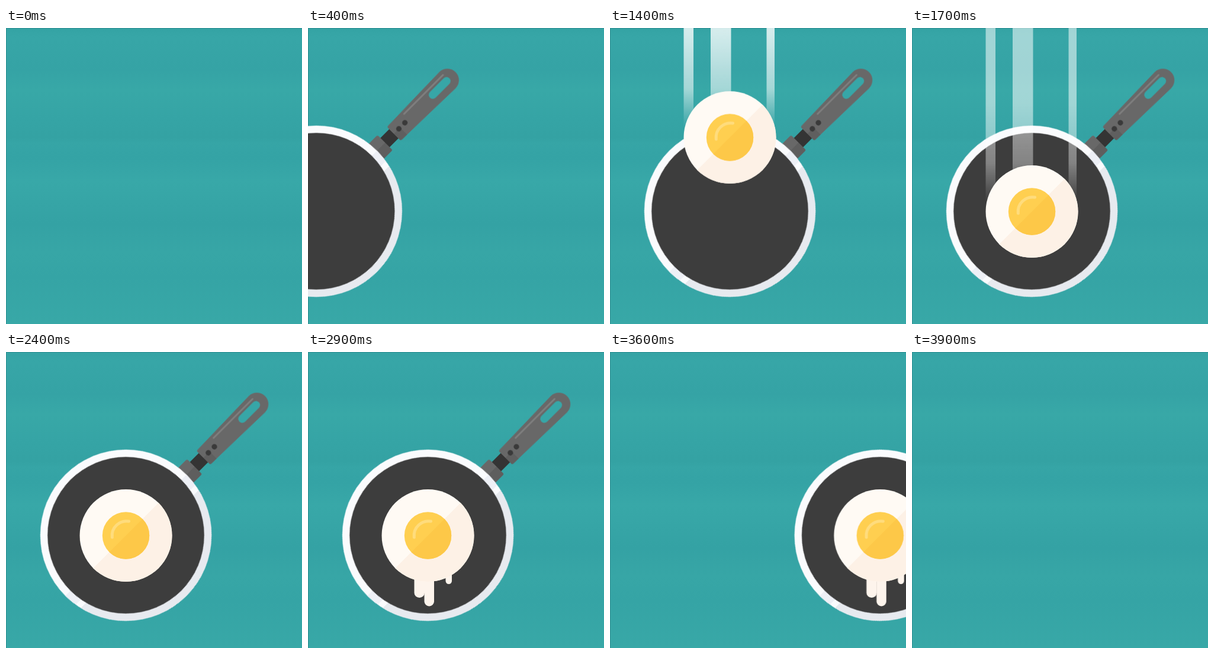
Write an HTML page that moves like this. It is 500x500 px and loops after 4 s.

```html
<!DOCTYPE html>
<html lang="en">
<head>
<meta charset="utf-8">
<title>Egg in a pan</title>
<style>
  html, body { margin: 0; width: 100%; height: 100%; overflow: hidden; background: #36a5a6; }
  svg { display: block; width: 100vw; height: 100vh; }

  .slide, .egg, .trails, .drip { animation: 4s linear infinite; }
  .slide  { animation-name: slide; }
  .egg    { animation-name: fall; }
  .trails { animation-name: fade; }
  .drip   { animation-name: drip; }

  @keyframes slide {
    0% { transform: translateX(-444px); animation-timing-function: cubic-bezier(.37, 0, .63, 1); }
    18.25%, 80% { transform: none; }
    97.5%, 100% { transform: translateX(444px); }
  }
  @keyframes fall {
    0%, 25% { transform: translateY(-390px); animation-timing-function: cubic-bezier(.37, 0, .63, 1); }
    41.25%, 100% { transform: none; }
  }
  @keyframes fade {
    0%, 37.5% { opacity: 1; }
    52.5%, 100% { opacity: 0; }
  }
  @keyframes drip {
    0%, 57.5% { transform: translateY(var(--up)); animation-timing-function: cubic-bezier(.37, 0, .63, 1); }
    72.5%, 100% { transform: none; }
  }
</style>
</head>
<body>
<svg viewBox="0 0 500 500">
  <defs>
    <linearGradient id="wall" x2="0" y2="1">
      <stop offset="0" stop-color="#34a3a4"/>
      <stop offset=".03" stop-color="#37a6a7"/>
      <stop offset=".14" stop-color="#35a3a5"/>
      <stop offset=".21" stop-color="#38a8a7"/>
      <stop offset=".31" stop-color="#35a4a5"/>
      <stop offset=".37" stop-color="#34a2a3"/>
      <stop offset=".39" stop-color="#36a5a6"/>
      <stop offset=".44" stop-color="#34a3a5"/>
      <stop offset=".52" stop-color="#38a8a8"/>
      <stop offset=".66" stop-color="#34a2a4"/>
      <stop offset=".76" stop-color="#37a6a6"/>
      <stop offset=".84" stop-color="#35a4a5"/>
      <stop offset="1" stop-color="#38a8a7"/>
    </linearGradient>
    <linearGradient id="streak" gradientUnits="userSpaceOnUse" x1="0" y1="127" x2="0" y2="295">
      <stop offset="0" stop-color="#fff" stop-opacity=".8"/>
      <stop offset=".6" stop-color="#fff" stop-opacity=".55"/>
      <stop offset="1" stop-color="#fff" stop-opacity="0"/>
    </linearGradient>
    <clipPath id="rim"><circle r="144.7"/></clipPath>
    <clipPath id="lower"><rect x="-200" width="400" height="200"/></clipPath>
  </defs>

  <rect width="500" height="500" fill="url(#wall)"/>
  <path d="M.5 500V.5H500" fill="none" stroke="#2f8f92"/>

  <g class="slide">
    <!-- pan, with x running along the handle -->
    <g transform="translate(202.5 309.5) rotate(-45)">
      <rect x="157" y="-11" width="32" height="22" fill="#343434"/>
      <rect x="130" y="-18" width="34" height="36" rx="3" fill="#686868"/>
      <path d="M130 0h34v15q0 3-3 3h-31z" fill="#5e5e5e"/>

      <path id="grip" d="M188-16.5L313-19.5A19.5 19.5 0 0 1 313 19.5L188 16.5Q185 16.5 185 13.5V-13.5Q185-16.5 188-16.5Z" fill="#686868"/>
      <use href="#grip" clip-path="url(#lower)" style="filter:brightness(.91)"/>
      <path d="M221-11.5H314" stroke="#7d7d7d" stroke-width="3" stroke-linecap="round"/>
      <path d="M278 0H311" stroke="#37a6a7" stroke-width="13.5" stroke-linecap="round"/>
      <g fill="#3a3a3a"><circle cx="197" r="4.6"/><circle cx="211.4" r="4.6"/></g>

      <g clip-path="url(#rim)">
        <rect x="-150" y="-150" width="300" height="300" fill="#fafbfd"/>
        <rect x="-150" width="300" height="23" fill="#eef0f6"/>
        <rect x="-150" y="33" width="300" height="120" fill="#e7eaef"/>
      </g>
      <circle r="132.4" fill="#3d3d3d"/>
    </g>

    <g class="egg">
      <g class="trails" fill="url(#streak)">
        <rect x="124.5" y="-100" width="16.5" height="395"/>
        <rect x="170" y="-100" width="34.5" height="395"/>
        <rect x="264.5" y="-100" width="13.5" height="395"/>
      </g>
      <g fill="#fdf4ec">
        <rect class="drip" style="--up:-34px" x="179.5" y="330" width="17.5" height="85" rx="8.5"/>
        <rect class="drip" style="--up:-48px" x="196.5" y="345" width="16.5" height="84.5" rx="8.2"/>
        <rect class="drip" style="--up:-18px" x="232.5" y="340" width="10.5" height="52" rx="5.2"/>
      </g>
      <g transform="translate(202.5 310) rotate(-45)">
        <circle r="78" fill="#fffaf4"/>
        <circle r="78" fill="#fdf1e6" clip-path="url(#lower)"/>
        <circle r="39.7" fill="#ffcf50"/>
        <circle r="39.7" fill="#fdc848" clip-path="url(#lower)"/>
      </g>
      <path d="M179.3 313A24.5 24.5 0 0 1 207.5 286" fill="none" stroke="#ffdc7c" stroke-width="5" stroke-linecap="round"/>
    </g>
  </g>
</svg>
<script>
  // Hold every pose for a tenth of a second.
  const STEP = 100;
  const motions = document.getAnimations();
  motions.forEach(m => m.pause());

  function tick() {
    const time = Math.floor(performance.now() / STEP) * STEP;
    motions.forEach(m => { m.currentTime = time; });
    requestAnimationFrame(tick);
  }
  tick();
</script>
</body>
</html>
```
